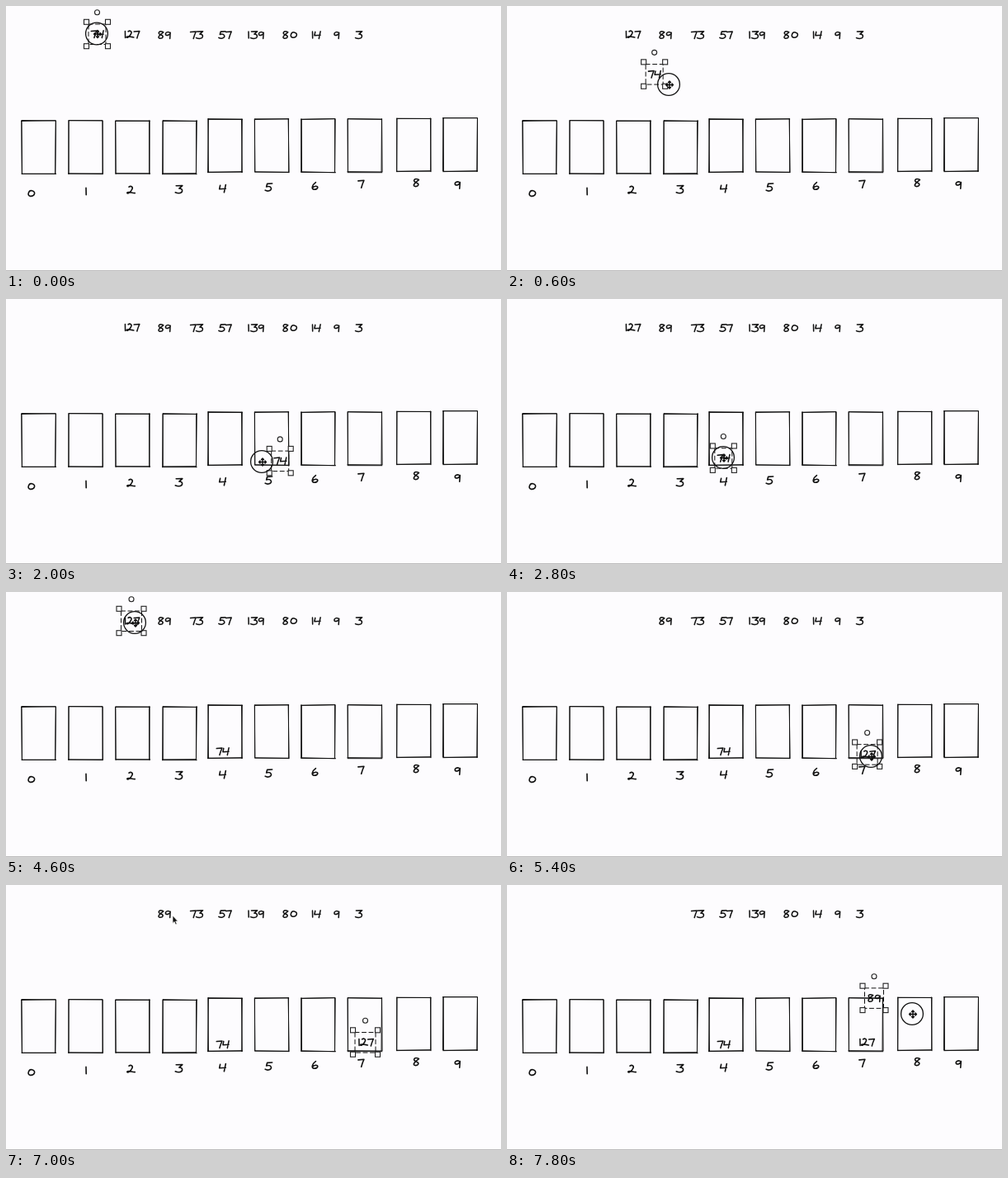
Write an HTML page that moves like this. It is 600 px wide and 321 px high and loops after 8000 ms.

```html
<!DOCTYPE html>
<html lang="en">
<head>
<meta charset="utf-8">
<title>Bucket sort sketch</title>
<style>
  html, body { margin: 0; width: 100%; height: 100%; overflow: hidden; background: #fdfcfe; }
  svg { display: block; width: 600px; height: 321px; }
  .ink { fill: none; stroke: #111; stroke-linecap: round; stroke-linejoin: round; }
  .handle { fill: #fdfcfe; stroke: #222; stroke-width: 1.1; }
</style>
</head>
<body>
<svg id="stage" viewBox="0 0 600 321" role="img" aria-label="Numbers dragged into buckets 0 to 9">
  <rect width="600" height="321" fill="#fdfcfe"/>
  <rect y="320" width="600" height="1" fill="#bdbdbd"/>
</svg>
<script>
const STEP = 200, LOOP = 8000, LAG = 0.35;
const stage = document.getElementById('stage');

// Pen strokes of each digit, centred on 0,0
const DIGITS = [
  'M1-3.4C-3-4.6-6 3-1 3.5C4 4 7-2 1-3.4',
  'M0-4.3L.2 4.5',
  'M-2.6-4C0-6 3-4 1.3-1C0 2-4 5.4-5 3.6C-5 1.6 0 3.4 5 3.8',
  'M-4-4.5L4-4.7L-.2-1C5.4-.6 5 4.6-.6 5Q-3 5-5 4',
  'M-3-4L-4 .8L4 .2M4-4.6L2 5',
  'M4.4-4.7L-2-4.3L-3-.6C3-2.4 6 3.4-.5 4.8Q-3 5-4.6 3.8',
  'M1-4.6C-4-1-5 4-1 4.5C4 4.4 5 .2 1 .3Q-2 .6-3 2.6',
  'M-3.8-3.8L3.6-4.5Q1.5 0 .2 5',
  'M3.6-3.6C-2-6.6-5-2 0-.2C5 1.8 3 5-1 4.8C-5 4-2 .4 3.6-3.6',
  'M3-2.4C0-5.4-4.6-3-3.2-.2C-1 1.6 2.6-.4 3-3L2.4 5'
];

function add(parent, tag, attrs) {
  const el = document.createElementNS('http://www.w3.org/2000/svg', tag);
  for (const k in attrs) el.setAttribute(k, attrs[k]);
  return parent.appendChild(el);
}
const move = (el, x, y) => el.setAttribute('transform', `translate(${x} ${y})`);
const show = (el, on) => el.setAttribute('visibility', on ? 'inherit' : 'hidden');

function write(text, xs, y, size = 0.9, parent = stage) {
  const g = add(parent, 'g', { class: 'ink', 'stroke-width': 1.7, 'aria-label': text });
  [...text].forEach((d, i) => add(g, 'path', {
    d: DIGITS[d], transform: `translate(${xs[i]} ${y}) scale(${size})`
  }));
  return g;
}

let seed = 7;
const jitter = () => ((seed = seed * 16807 % 2147483647) / 2147483647 - 0.5) * 1.1;

function bucket(x, y, w, h) {
  const p = (px, py) => `${px + jitter()} ${py + jitter()}`;
  const line = (a, b, c, d) => `M${p(a, b)}L${p(c, d)}`;
  let d = '';
  for (let pass = 0; pass < 2; pass++) {
    d += line(x, y, x + w, y) + line(x + w, y, x + w, y + h) +
         line(x + w, y + h, x, y + h) + line(x, y + h, x, y);
  }
  add(stage, 'path', { class: 'ink', d, 'stroke-width': 1 });
}

const LEFT = [19, 76, 133, 190, 245, 301.5, 358, 414.5, 473.5, 530];
const LABEL_X = [30.5, 97, 151.5, 210, 262.5, 318.5, 374.5, 430.5, 497, 547.5];
const LABEL_Y = [227, 224.5, 223, 222, 221, 219.5, 218, 215.5, 214, 216.5];
LEFT.forEach((x, i) => {
  const top = i < 4 ? 139 : i < 8 ? 137 : 136;
  bucket(x, top, 41, 64.2);
  write(String(i), [LABEL_X[i]], LABEL_Y[i], 0.95);
});

[['73', [227, 235]], ['57', [262, 270]], ['139', [294, 301, 309.5]], ['80', [338.5, 348.5]],
 ['14', [371.5, 377.5]], ['9', [401]], ['3', [428]]].forEach(([n, xs]) => write(n, xs, 35));

// Draggable numbers: held from step a to b, grab = pen position relative to the centre
const items = [
  { text: '74', xs: [-3.8, 4], half: 13, home: [110.5, 34.5], grab: [-0.5, -0.5], a: 0, b: 18, rest: [262.5, 193] },
  { text: '127', xs: [-7.6, -1.6, 6.6], half: 15, home: [152, 34.5], grab: [4, 2], a: 23, b: 30, rest: [435.5, 190.5] },
  { text: '89', xs: [-4.5, 4.5], half: 14, home: [192, 35], grab: [11, 10], a: 37, b: 39 }
];

function buildItem(it) {
  it.el = add(stage, 'g', {});
  write(it.text, it.xs, 0, 0.9, it.el);
  const box = it.frame = add(it.el, 'g', {}), h = it.half;
  add(box, 'rect', { class: 'ink', x: 2.5 - h, y: -12, width: 2 * h - 5, height: 24.5,
    'stroke-width': 1, 'stroke-dasharray': '5 3.5', 'stroke-linecap': 'butt' });
  for (const x of [-h, h]) for (const y of [-14.7, 14.7]) {
    add(box, 'rect', { class: 'handle', x: x - 3, y: y - 3, width: 6, height: 6 });
  }
  add(box, 'circle', { class: 'handle', cy: -26.2, r: 3 });
}
items.forEach(buildItem);

const press = add(stage, 'g', {});
add(press, 'circle', { class: 'ink', r: 13.4, 'stroke-width': 1.3 });
const CROSS = 'M-4 0H4M0-4V4M-3-1.4L-4.4 0L-3 1.4M3-1.4L4.4 0L3 1.4M-1.4-3L0-4.4L1.4-3M-1.4 3L0 4.4L1.4 3';
add(press, 'path', { class: 'ink', d: CROSS, transform: 'translate(1 .5)', 'stroke-width': 1.5 });

const arrow = add(stage, 'path', { d: 'M0 0V9.4L2.1 7.5L3.6 11L5.2 10.3L3.7 7H6.4Z',
  fill: '#111', stroke: '#fff', 'stroke-width': 0.7 });

// Pointer position at each step; gaps hold the last one
const pen = [
  [110, 33.5], [116, 38], [145, 58], [196, 95], [250, 134], [301, 164], [355, 181],
  [388, 189], [399, 190], [372, 193], [310, 197], [252, 197], [256, 198], [261.5, 192.5], [262, 192],
  , , , , [252, 165], [222, 115], [176, 58], [156, 37],
  , [214, 85], [330, 141], [440, 198], [441, 199], [444, 198], [441, 193], [440, 192],
  [425, 175], [380, 142], [320, 101], [250, 60], [202, 37], [203, 45],
  , [391, 130], [491, 156]
];
for (let i = 1; i < pen.length; i++) pen[i] = pen[i] || pen[i - 1];
const released = n => (n >= 19 && n <= 21) || (n >= 31 && n <= 35);

function place(it, n) {
  if (n < it.a) return it.home;
  if (n > it.b) return it.rest;
  const now = pen[n], prev = pen[Math.max(n - 1, 0)];
  return now.map((v, k) => v - it.grab[k] - LAG * (v - prev[k]));
}

function draw(n) {
  const chosen = n < 23 ? 0 : n < 37 ? 1 : 2;
  items.forEach((it, i) => {
    move(it.el, ...place(it, n));
    show(it.frame, i === chosen);
  });
  const free = released(n);
  show(press, !free);
  show(arrow, free);
  move(free ? arrow : press, ...pen[n]);
}

const start = performance.now();
let last = 0;
draw(0);
function tick() {
  const n = Math.floor((performance.now() - start) % LOOP / STEP);
  if (n !== last) draw(last = n);
  requestAnimationFrame(tick);
}
requestAnimationFrame(tick);
</script>
</body>
</html>
```
